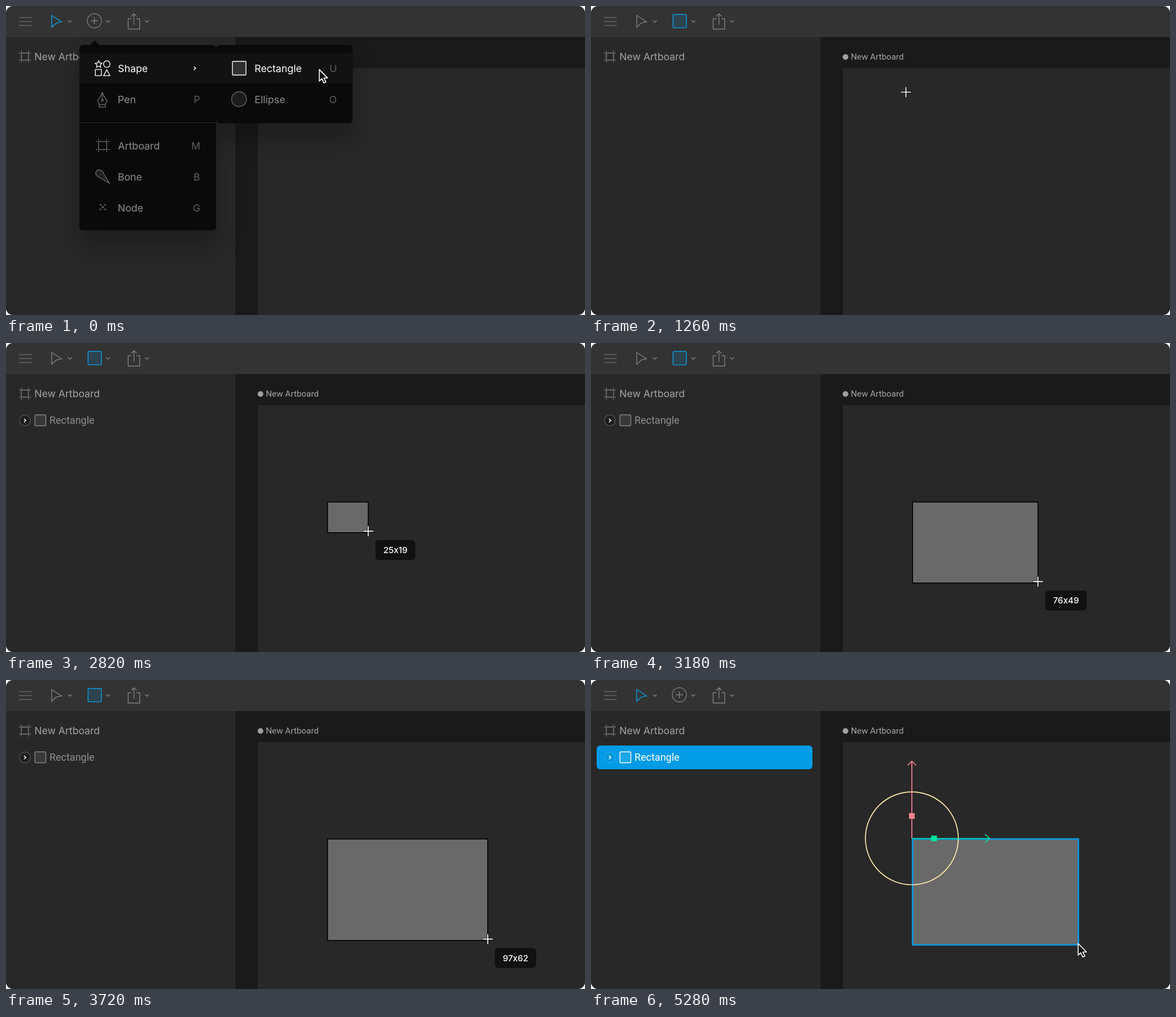
Animation, 1025 px wide and 547 px high, one loop 5370 ms. Source, as an HTML page:

```html
<!DOCTYPE html>
<html lang="en">
<head>
<meta charset="utf-8">
<title>Drawing a rectangle</title>
<style>
  html, body { margin: 0; width: 100%; height: 100%; overflow: hidden; background: #fff; }
  svg { display: block; width: 100vw; height: 100vh; }
  text { font-family: Roboto, sans-serif; }
  .ui { font: 17.8px Inter, sans-serif; }
  .line { fill: none; stroke: #7f7f7f; stroke-width: 1.37; }
  .blue { stroke: #0d9fe4; }
  .white { stroke: #fff; }
  .dim { stroke: #666; }
  .label { fill: #8e8e8e; }
  .hot { fill: #fff; }
  .key { fill: #5e5e5e; text-anchor: end; }
  .shade { filter: drop-shadow(0 28px 20px rgba(0, 0, 0, .25)); }
  .dark { fill: #0a0a0a; }
  .arrow { fill: #111; stroke: #fff; stroke-width: 1.7; stroke-linejoin: round; filter: drop-shadow(0 1px 1px rgba(0, 0, 0, .4)); }
</style>
</head>
<body>
<svg viewBox="0 0 1025 547" preserveAspectRatio="none">
  <defs>
    <clipPath id="card"><rect width="1025" height="547" rx="13"/></clipPath>
    <path id="chevron" class="line" d="M-3.4 -1.6L0 1.7L3.4 -1.6"/>
    <path id="next" d="M-1.6 -3L1.5 0L-1.6 3" fill="none" stroke="#fff" stroke-width="1.6"/>
    <path id="pointer" d="M81 16.8L98.3 28.2L89 30.2L81 37.6Z"/>
    <path id="frame" d="M-6.3 -6.3H6.3V6.3H-6.3Z
      M-6.3 -10.5V-8M6.3 -10.5V-8M-6.3 8V10.5M6.3 8V10.5
      M-10.5 -6.3H-8M-10.5 6.3H-8M8 -6.3H10.5M8 6.3H10.5"/>
    <path id="mouse" class="arrow" d="M0 0V20.6L4.6 16.4L8.2 24L11.8 22.3L8.3 15H14.6Z"/>
  </defs>

  <g clip-path="url(#card)">
    <rect width="1025" height="547" fill="#1a1a1a"/>
    <rect y="55" width="406" height="492" fill="#282828"/>
    <rect x="446" y="110" width="579" height="437" fill="#282828"/>
    <rect width="1025" height="55" fill="#333"/>

    <!-- toolbar -->
    <path class="line dim" d="M23 20.5H45.5M23 27.5H45.5M23 34.5H45.5"/>
    <use href="#chevron" x="113" y="27"/>
    <use href="#chevron" x="181" y="27"/>
    <use href="#chevron" x="249.5" y="27"/>
    <path class="line" d="M222 22.5H216.3V40.7H236.7V22.5H231M226.5 33V14M221.7 18.6L226.5 13.8L231.3 18.6"/>
    <g data-from="750" data-to="4560">
      <use href="#pointer" class="line"/>
      <rect class="line blue" x="145.3" y="15" width="23.6" height="23.6" rx="1.5" style="fill:#2c4350"/>
    </g>
    <g data-from="4560" data-to="750">
      <use href="#pointer" class="line blue"/>
      <path class="line" d="M150.3 26.2H162.7M156.5 20V32.4"/>
      <circle class="line" cx="156.5" cy="26.2" r="12.6"/>
    </g>

    <!-- layers -->
    <use href="#frame" class="line" x="33.5" y="89.5"/>
    <text class="ui" x="50.3" y="96.4" fill="#a3a3a3" style="font-size:17.6px">New Artboard</text>
    <g data-from="2460" data-to="4560">
      <circle cx="33.5" cy="137" r="9.6" fill="#1d1d1d" stroke="#555" stroke-width="1.2"/>
      <use href="#next" x="33.5" y="137"/>
      <rect x="51.2" y="127.2" width="19.3" height="19.3" rx="2" fill="#393939" stroke="#858585" stroke-width="1.4"/>
      <text x="76.9" y="143.2" font-size="18" class="label">Rectangle</text>
    </g>
    <g data-from="4560" data-to="5370">
      <rect x="10" y="116" width="382" height="42" rx="6" fill="#029be5"/>
      <circle cx="33.5" cy="137" r="9.6" fill="#0296dd" stroke="#22a9ea" stroke-width="1.2"/>
      <use href="#next" x="33.5" y="137"/>
      <rect x="51.2" y="127.2" width="19.3" height="19.3" rx="2" fill="#1ca6e8" stroke="#fff" stroke-width="1.4"/>
      <text x="76.9" y="143.2" font-size="18" class="hot">Rectangle</text>
    </g>

    <!-- canvas -->
    <circle cx="450.5" cy="90.3" r="5" fill="#a0a0a0"/>
    <text x="460" y="95.2" font-size="15.2" fill="#a5a5a5">New Artboard</text>
    <rect id="shape" x="569.3" y="281.5" fill="#696969" stroke="#000" stroke-width="1.6"/>
    <g data-from="4560" data-to="5370">
      <rect x="569.3" y="281.5" width="293.5" height="187.3" fill="none" stroke="#0d98de" stroke-width="2.8"/>
      <g fill="none" stroke-width="1.7">
        <circle cx="568" cy="280.3" r="82.2" stroke="#ffe9ac"/>
        <path d="M568 280.5V144M560.8 151L568 143.6L575.2 151" stroke="#ff8096"/>
        <path d="M568 280.5H705M697.5 273.2L705.3 280.5L697.5 287.8" stroke="#00e3a0"/>
      </g>
      <rect x="563" y="235.7" width="10" height="10" fill="#ff8096"/>
      <rect x="602" y="275.5" width="10.4" height="10" fill="#00e3a0"/>
      <use href="#mouse" x="862.4" y="466.5"/>
    </g>

    <!-- menus -->
    <g data-from="0" data-to="750">
      <g class="dark shade">
        <path d="M148 70L155 62.6Q157 60.6 159 62.6L166 70Z"/>
        <rect x="130" y="69" width="242" height="328" rx="6"/>
        <rect x="372" y="69" width="241.5" height="138.5" rx="6"/>
      </g>
      <rect x="130" y="83" width="483.5" height="54" fill="#121212"/>
      <path d="M130 206.5H372" stroke="#292929"/>

      <path class="line white" d="M164 97L165.8 100.8L170 101.4L167 104.3L167.7 108.5L164 106.5L160.3 108.5L161 104.3L158 101.4L162.2 100.8Z
        M158.2 112.4H168.8V123.4H158.2ZM178.4 112.8L184 123.4H172.8Z"/>
      <circle class="line white" cx="178.4" cy="102.8" r="5.8"/>
      <use href="#next" x="334.2" y="110.3"/>
      <g class="line dim">
        <path d="M170.5 152.5C172 158.5 175 162.5 178.8 167L175.5 174.5H165.5L162.2 167C166 162.5 169 158.5 170.5 152.5V165M165 174.5V179H176V174.5"/>
        <circle cx="170.5" cy="167" r="1.7"/>
        <use href="#frame" transform="translate(171 247) scale(1.15)"/>
        <path fill="#222" d="M183 314L161 301C156.7 297 159.5 290 165 290C169 290 171.5 292.5 172.8 296.5Z"/>
        <path d="M167 354V351.5H169.5M173.5 351.5H176V354M176 358V360.5H173.5M169.5 360.5H167V358M169.3 356H173.7M171.5 353.8V358.2"/>
        <circle cx="412.6" cy="165" r="13.2" fill="#1c1c1c"/>
      </g>
      <rect class="line white" x="400.8" y="98" width="24" height="24.3" rx="1.5" style="fill:#303030"/>
      <g id="items"></g>
      <use href="#mouse" x="554.6" y="112.3"/>
    </g>

    <!-- crosshair and size tag -->
    <g id="cross" data-from="750" data-to="4560" fill="none">
      <path d="M-10 0H10M0 -10V10" stroke="#000" stroke-opacity=".55" stroke-width="4"/>
      <path d="M-9 0H9M0 -9V9" stroke="#fff" stroke-width="1.7"/>
    </g>
    <g id="tag" data-from="2460" data-to="4560">
      <rect id="tagBox" height="35.2" rx="5.5" fill="#111"/>
      <text id="size" class="ui hot" x="13.8" y="23.2" style="font-size:15.2px;font-weight:500"></text>
    </g>
  </g>
</svg>
<script>
const LOOP = 5370, STEP = 30;
const LEFT = 569.3, TOP = 281.5, UNIT = 2.915;
const byId = id => document.getElementById(id);

// text, key, left, right, baseline
const items = [
  ['Shape', '', 198, 344, 117.4], ['Pen', 'P', 197.8, 343.5, 172.3],
  ['Artboard', 'M', 198.3, 344, 254.4], ['Bone', 'B', 197.8, 343.5, 309],
  ['Node', 'G', 197.8, 344, 363.8],
  ['Rectangle', 'U', 440, 586, 117.4], ['Ellipse', 'O', 440, 585.5, 172.3]
];
byId('items').innerHTML = items.map(([name, key, x, end, y]) =>
  `<text class="ui ${y < 120 ? 'hot' : 'label'}" x="${x}" y="${y}">${name}</text>` +
  `<text class="ui key" x="${end}" y="${y}">${key}</text>`).join('');

// pointer path: time, x, y
const path = [
  [750, 554.5, 113], [1260, 557.5, 152.5], [1500, 565, 232], [1830, 569.5, 279.5],
  [2460, 569.5, 279.5], [2820, 641.3, 333.2], [2970, 702.5, 368], [3180, 791.3, 422.4],
  [3510, 847.5, 453.5], [3720, 852.8, 458.7], [4050, 860.5, 464.5], [4560, 862.8, 466.4]
];
const slope = (i, k) => (path[i + 1][k] - path[i][k]) / (path[i + 1][0] - path[i][0]);

// monotone tangent at a path point
function tangent(i, k) {
  if (i === 0 || i === path.length - 1) return 0;
  const a = slope(i - 1, k), b = slope(i, k);
  return a * b > 0 ? 2 * a * b / (a + b) : 0;
}

function at(t, k) {
  let i = 0;
  while (i < path.length - 2 && t >= path[i + 1][0]) i++;
  const [t0, t1] = [path[i][0], path[i + 1][0]];
  const d = t1 - t0, u = Math.min(1, Math.max(0, (t - t0) / d)), v = 1 - u;
  return path[i][k] * v * v * (1 + 2 * u) + path[i + 1][k] * u * u * (3 - 2 * u)
    + d * u * v * (tangent(i, k) * v - tangent(i + 1, k) * u);
}

const timed = [...document.querySelectorAll('[data-from]')].map(el =>
  ({ el, from: +el.dataset.from, to: +el.dataset.to }));
const show = (el, on) => el.setAttribute('visibility', on ? 'visible' : 'hidden');

function draw(t) {
  for (const { el, from, to } of timed)
    show(el, from < to ? t >= from && t < to : t >= from || t < to);

  const x = at(t, 1), y = at(t, 2);
  const w = Math.max(0, x - LEFT), h = Math.max(0, y + 2.5 - TOP);
  byId('cross').setAttribute('transform', `translate(${x} ${y})`);

  const shape = byId('shape');
  show(shape, t > 2460 && w > 0.5);
  shape.setAttribute('width', w);
  shape.setAttribute('height', h);

  const size = byId('size');
  size.textContent = Math.round(w / UNIT) + 'x' + Math.round(h / UNIT);
  byId('tagBox').setAttribute('width', size.getComputedTextLength() + 27.6);
  byId('tag').setAttribute('transform', `translate(${x + 12.8} ${y + 15.8})`);
}

let start;
function tick(now) {
  start ??= now;
  draw(Math.floor((now - start) % LOOP / STEP) * STEP);
  requestAnimationFrame(tick);
}
draw(0);
requestAnimationFrame(tick);
</script>
</body>
</html>
```
